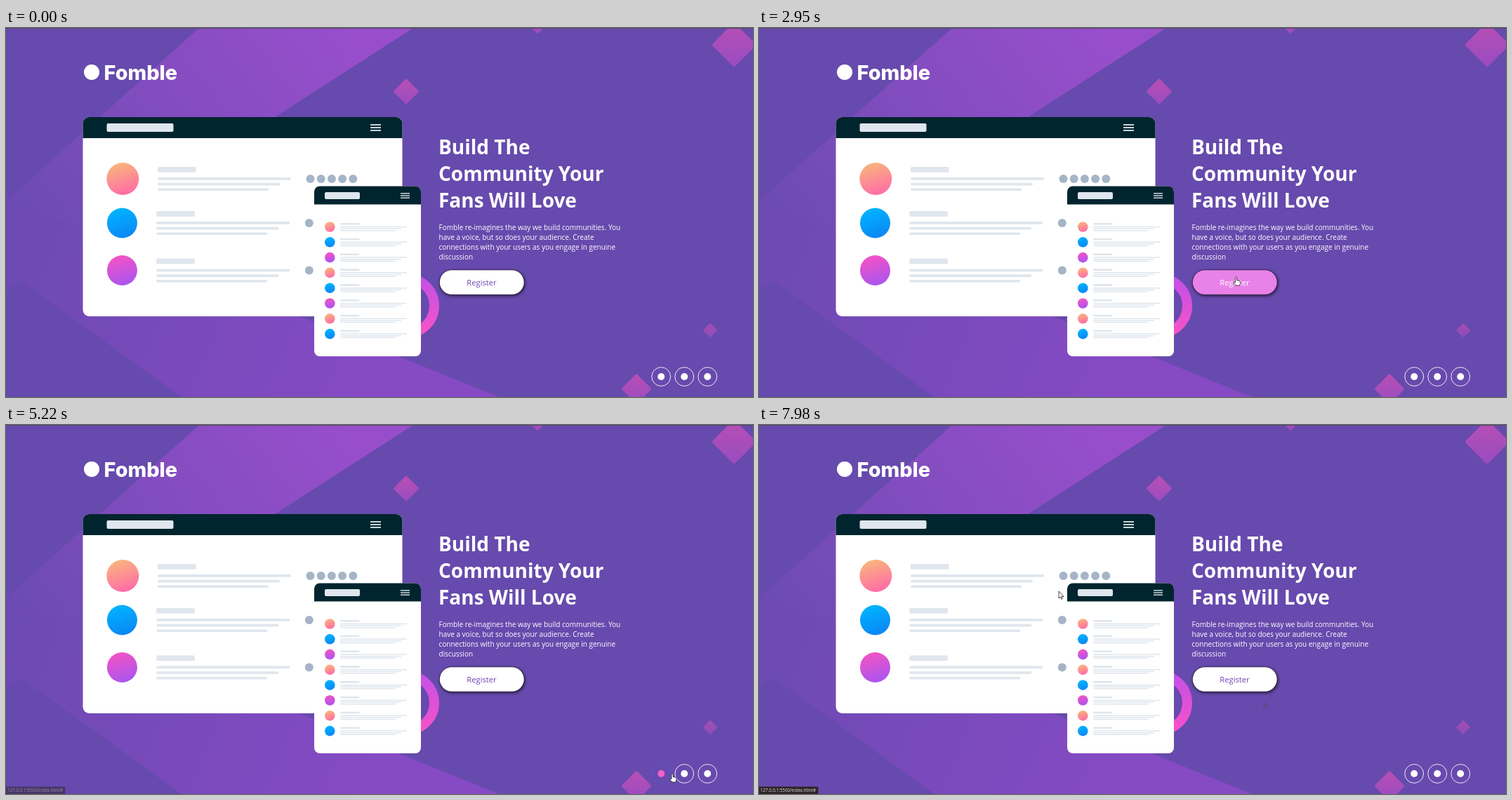
Write an HTML page with a canvas that moves like this. It is 1064 px wide and 526 px high and loops after 8 s.

```html
<!DOCTYPE html>
<html lang="en">
<head>
<meta charset="utf-8">
<title>Landing page</title>
<style>
  html, body { margin: 0; width: 100%; height: 100%; overflow: hidden; background: #674aad; }
  canvas, svg { position: absolute; left: 0; top: 0; width: 1064px; height: 526px; }
  text { font-family: "Open Sans", "Noto Sans", sans-serif; fill: #fff; }
  .logo { font: 800 28.8px Inter, sans-serif; }
  .title { font-size: 28px; font-weight: 700; }
  .body { font-size: 10px; }
  #label { font-size: 11.2px; text-anchor: middle; }
  #url { font-size: 6.2px; fill: #e4dfe2; }
  .pointer { fill: #fff; stroke: #1c1c1c; stroke-width: .8; stroke-linejoin: round; }
</style>
</head>
<body>
<canvas id="scene" width="1064" height="526"></canvas>
<svg viewBox="0 0 1064 526">
  <text class="logo" x="139.5" y="74">Fomble</text>
  <g class="title">
    <text x="616" y="180">Build The</text>
    <text x="616" y="218">Community Your</text>
    <text x="616" y="256">Fans Will Love</text>
  </g>
  <g class="body">
    <text x="616.5" y="288">Fomble re-imagines the way we build communities. You</text>
    <text x="616.5" y="302">have a voice, but so does your audience. Create</text>
    <text x="616.5" y="316">connections with your users as you engage in genuine</text>
    <text x="616.5" y="330">discussion</text>
  </g>
  <text id="label" x="677.5" y="366.5">Register</text>
  <text id="url" x="2" y="523">127.0.0.1:5500/index.html#</text>
  <path id="trail" transform="translate(718 393)" fill="#5a4880" d="M0 0V10L2.3 8L3.8 11.3L5.3 10.6L3.9 7.5H7Z"/>
  <path id="arrow" class="pointer" d="M0 0V10L2.3 8L3.8 11.3L5.3 10.6L3.9 7.5H7Z"/>
  <path id="hand" class="pointer" d="M-1.1 1Q-1.1 -.3 0 -.3Q1.1 -.3 1.1 1V4.6L5 5.4Q6 5.7 6 6.8L5.3 12H-.6L-3.6 7.8Q-3.9 6.9 -3 6.6L-1.1 8Z"/>
</svg>
<script>
const LOOP = 8000, STEP = 70;
const PURPLE = '#674aad', PINK = '#e882e8', DARK = '#00252e', PALE = '#dfe6ed', DOT = '#a5b4c6';
const AVATARS = [['#f9b57c', '#ff6aa8'], ['#00b4ff', '#0a86f5'], ['#f453c4', '#a855f0']];
const LINKS = [0, 1, 2].map(i => 933.2 + i * 33);
const $ = id => document.getElementById(id);
const ctx = $('scene').getContext('2d');

// Pointer legs: start, end, goal x, goal y, sideways bend.
const LEGS = [
  [160, 1010, 749, 166, 0],
  [1010, 1780, 640, 281, 1.6],
  [1850, 2410, 655, 249, -1.5],
  [2670, 2950, 679.5, 355, 0],
  [3760, 4330, 864, 457, 0],
  [4330, 4540, 911, 486, 0],
  [4600, 5220, 949, 497, 0],
  [5220, 5980, 999, 498, 0],
  [6180, 6390, 952.5, 498, 0],
  [6390, 6530, 942, 498, 0],
  [6730, 7360, 718, 393, 0],
  [7360, 7430, 712, 368, 0],
  [7560, 7980, 427, 237, .5]
];

// Follows the legs in turn; each is a bent curve walked in even steps.
function pointer(t) {
  let x = 1038, y = 516;
  for (const [start, end, gx, gy, bend] of LEGS) {
    if (t < start) break;
    const steps = Math.floor((t - start) / STEP + 1e-4);
    const k = t >= end ? 1 : steps * STEP / (end - start);
    const dx = gx - x, dy = gy - y, bow = 2 * k * (1 - k) * bend;
    x += dx * k - dy * bow;
    y += dy * k + dx * bow;
  }
  return { x, y };
}

function statusAlpha(t) {
  if (t < 3360) return 0;
  return t < 3430 || (t > 4000 && t < 5400) ? .5 : 1;
}

function fade(x0, y0, x1, y1, from, to) {
  const g = ctx.createLinearGradient(x0, y0, x1, y1);
  g.addColorStop(0, from);
  g.addColorStop(1, to);
  return g;
}

function box(x, y, w, h, r, fill) {
  ctx.fillStyle = fill;
  ctx.beginPath();
  ctx.roundRect(x, y, w, h, r);
  ctx.fill();
}

function disc(x, y, r, fill) {
  ctx.fillStyle = fill;
  ctx.beginPath();
  ctx.arc(x, y, r, 0, Math.PI * 2);
  ctx.fill();
}

function ring(x, y, r, width, stroke) {
  ctx.lineWidth = width;
  ctx.strokeStyle = stroke;
  ctx.beginPath();
  ctx.arc(x, y, r, 0, Math.PI * 2);
  ctx.stroke();
}

function poly(points, fill) {
  ctx.fillStyle = fill;
  ctx.beginPath();
  points.forEach(p => ctx.lineTo(...p));
  ctx.fill();
}

function diamond(x, y, r) {
  const h = r * .73;
  ctx.save();
  ctx.translate(x, y);
  ctx.rotate(Math.PI / 4);
  box(-h, -h, h * 2, h * 2, r / 12, fade(-h, -h, h, h, '#b94fb4', '#994cc1'));
  ctx.restore();
}

function avatar(x, y, r, kind) {
  disc(x, y, r, fade(x - r * .3, y - r, x + r * .3, y + r, ...AVATARS[kind]));
}

function menu(x, y, w, gap, h) {
  for (let i = -1; i <= 1; i++) box(x, y + i * gap - h / 2, w, h, 0, PALE);
}

// Three bars, each shorter than the one above.
function lines(x, y, w, cut, gap, h) {
  for (let i = 0; i < 3; i++) box(x, y + i * gap, w - i * cut, h, h / 2.4, PALE);
}

function backdrop() {
  ctx.fillStyle = PURPLE;
  ctx.fillRect(0, 0, 1064, 526);
  poly([[275, 0], [580, 0], [0, 374], [0, 247]], fade(30, 290, 450, -40, '#6c4bb3', '#984ecb'));
  poly([[0, 242], [702, 526], [250, 526], [0, 345]], fade(0, 290, 560, 510, '#6c4ab2', '#874ac5'));
  diamond(1037, 24, 31);
  diamond(570, 90.5, 18);
  diamond(757, -1, 9);
  diamond(898, 514.5, 21);
  ctx.globalAlpha = .75;
  diamond(1003, 431, 10);
  ctx.globalAlpha = 1;
  ring(571, 396, 39, 14, fade(0, 350, 0, 442, '#c050e8', '#fa53c6'));
  ctx.fillStyle = '#54486e';
  ctx.fillRect(0, 0, 1064, 1);
}

function desktop() {
  box(109.5, 127, 455, 284, 9, '#fff');
  box(109.5, 127, 455, 30, [9, 9, 0, 0], DARK);
  box(143.5, 136, 95, 12, 2, PALE);
  menu(519, 142, 15, 4, 1.8);
  [215, 278, 345.5].forEach((y, i) => {
    const shift = i ? -1.7 : 0;
    avatar(166.3 + shift / 2, y, i ? 21.5 : 23, i);
    box(216 + shift, y - 17, 54.5, 7.8, 1.5, PALE);
    lines(216 + shift, y - 2, 190, 16, 7.7, 3.7);
    for (let k = 0; k < 5; k++) disc(433.5 + shift + k * 15.2, y, 6, DOT);
  });
}

function phone() {
  box(439, 225.5, 152, 242.5, 8, '#fff');
  box(439, 225.5, 152, 26, [8, 8, 0, 0], DARK);
  box(454, 234, 50, 10, 2, PALE);
  menu(562, 239, 13, 3.2, 1.4);
  for (let i = 0; i < 8; i++) {
    const y = 283.5 + i * 21.8;
    avatar(461.3, y, 7.3, i % 3);
    box(476, y - 5.6, 27.5, 2.6, 1, PALE);
    lines(476, y - .8, 95, 8, 2.6, 1.5);
  }
}

function button(hot) {
  ctx.save();
  ctx.shadowColor = 'rgba(0,0,0,.65)';
  ctx.shadowBlur = 4;
  ctx.shadowOffsetX = 1;
  ctx.shadowOffsetY = 1.5;
  box(617, 344.5, 121.5, 36, 18, '#37294f');
  ctx.restore();
  box(617.8, 345.3, 119.9, 34.4, 17.2, hot ? PINK : '#fff');
  $('label').style.fill = hot ? '#fff' : '#6a45b4';
}

function social(active) {
  LINKS.forEach((x, i) => {
    const hot = i === active;
    ring(x, 497, 13.4, 1, hot ? '#5458d4' : '#eee8f8');
    disc(x, 497, 5, hot ? '#f560d0' : '#fff');
  });
}

function draw(t) {
  const p = pointer(t);
  const onButton = Math.abs(p.x - 678) < 60 && Math.abs(p.y - 363) < 17;
  const active = LINKS.findIndex(x => Math.hypot(p.x - x, p.y - 497) <= 16);
  const linked = onButton || active >= 0;

  backdrop();
  disc(122, 63, 11, '#fff');
  desktop();
  phone();
  button(onButton);
  social(active);

  const status = statusAlpha(t);
  ctx.globalAlpha = status;
  box(0, 515.5, 84.5, 11, [0, 2, 0, 0], '#2d2528');
  ctx.globalAlpha = 1;
  $('url').style.opacity = status;

  $('trail').style.opacity = t >= 7430 ? .8 : 0;
  for (const id of ['arrow', 'hand']) {
    const shown = t >= 160 && linked === (id === 'hand');
    $(id).style.display = shown ? '' : 'none';
    $(id).setAttribute('transform', `translate(${p.x} ${p.y})`);
  }
}

const begin = performance.now();
function tick(now) {
  draw(Math.max(0, now - begin) % LOOP);
  requestAnimationFrame(tick);
}
draw(0);
requestAnimationFrame(tick);
</script>
</body>
</html>
```
